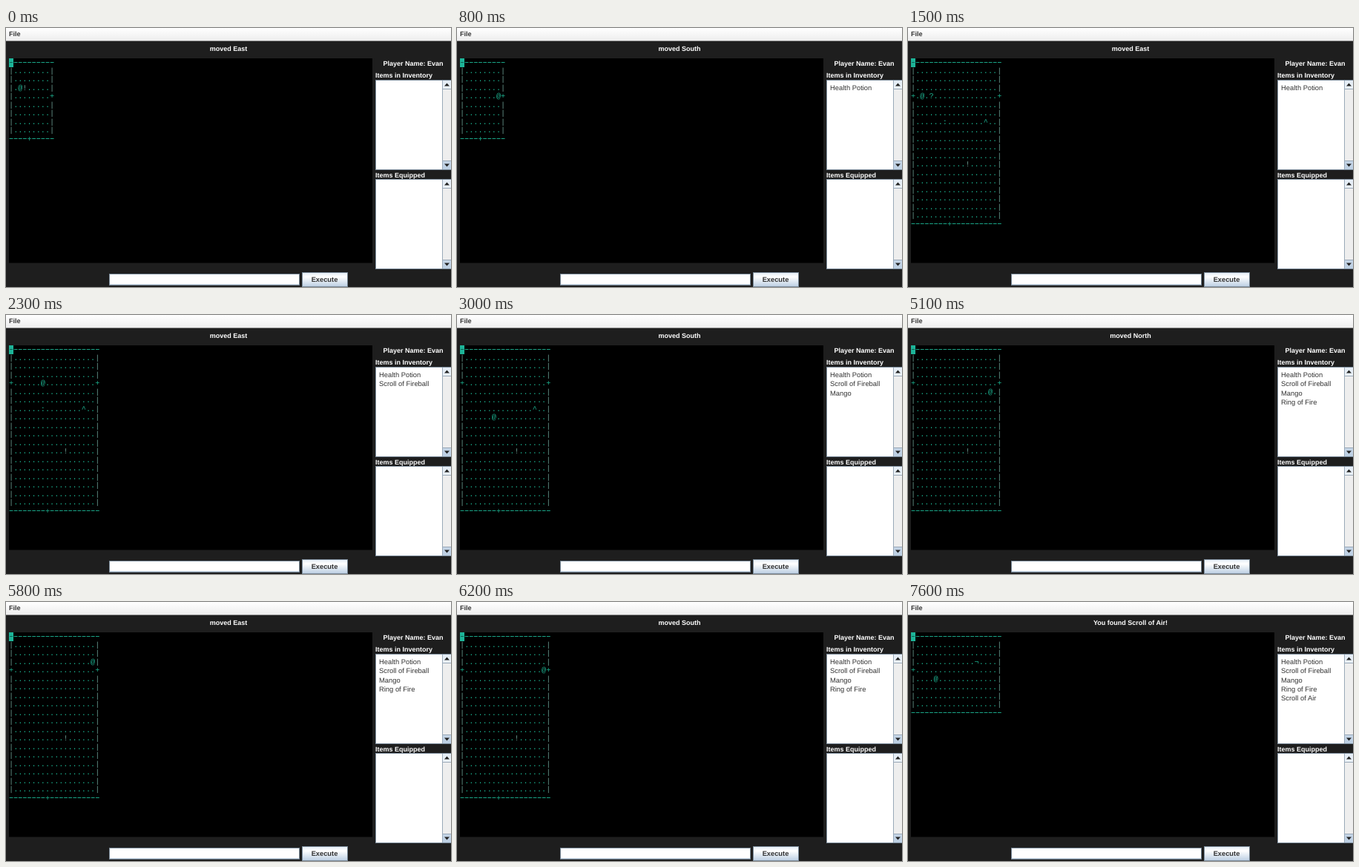
An HTML page for the animation above (7.7 s loop, 600x350 px).

```html
<!DOCTYPE html>
<html lang="en">
<head>
<meta charset="utf-8">
<title>Dungeon crawler</title>
<style>
  html, body { margin: 0; width: 100%; height: 100%; overflow: hidden; background: #1e1e1e; }
  svg { display: block; width: 600px; height: 350px; }
  text { font: 9.4px "Liberation Sans", Arial, sans-serif; fill: #333; white-space: pre; text-rendering: geometricPrecision; }
  .bold { font-weight: bold; font-size: 9px; }
  .light { fill: #fff; }
  .mid { text-anchor: middle; }
  #map text { font: 10.2px "Liberation Mono", "Courier New", monospace; fill: #1db492; }
  #map .dim { fill: #6a9c90; }
  #map path { stroke: #1aa587; stroke-width: 1; fill: none; }
</style>
</head>
<body>
<svg viewBox="0 0 600 350">
  <defs>
    <linearGradient id="bar" x2="0" y2="1">
      <stop stop-color="#fff"/><stop offset="1" stop-color="#ededed"/>
    </linearGradient>
    <linearGradient id="metal" x2="0" y2="1">
      <stop stop-color="#e3ecf5"/><stop offset=".3" stop-color="#fff"/><stop offset="1" stop-color="#bccfe3"/>
    </linearGradient>
    <g id="list">
      <rect x=".5" y=".5" width="102" height="121" fill="#fff" stroke="#7a8a99"/>
      <rect x="90" y="1" width="12" height="120" fill="#eee"/>
      <path d="M90.5 1V121M90 12.5H102M90 109.5H102" stroke="#9aa9b8"/>
      <path d="M91 1H102V12H91ZM91 110H102V121H91Z" fill="url(#metal)"/>
      <path d="M93 8.5L96.5 4.5L100 8.5ZM93 113.5L96.5 117.5L100 113.5Z" fill="#222"/>
    </g>
  </defs>

  <rect width="600" height="350" fill="#1e1e1e"/>
  <rect width="600" height="17.5" fill="url(#bar)"/>
  <text class="bold" x="4" y="11.3">File</text>
  <text class="bold light mid" id="message" x="300" y="31.3"></text>

  <rect x="4" y="41" width="490" height="276.5"/>
  <g id="map"></g>
  <rect x="4" y="41" width="6" height="12" fill="#1db498"/>
  <path d="M5 46.5h4" stroke="#0c5f50"/>

  <text class="bold light mid" x="549" y="51.3">Player Name: Evan</text>
  <text class="bold light" x="498" y="67.3">Items in Inventory</text>
  <use href="#list" x="498" y="70"/>
  <g id="items"></g>
  <text class="bold light" x="498" y="201.5">Items Equipped</text>
  <use href="#list" x="498" y="204"/>

  <rect x="139.5" y="332.5" width="256" height="15" fill="#fff" stroke="#7a8a99"/>
  <path d="M140 346.5H395" stroke="#c5d3e0"/>
  <rect x="399.5" y="330.5" width="61" height="19" fill="url(#metal)" stroke="#7a8a99"/>
  <text class="bold mid" x="429.5" y="343.4" style="font-size:9.3px">Execute</text>
</svg>

<script>
const LOOP = 7700, CELL_W = 6.125, CELL_H = 11.5;

const rooms = [
  { w: 10, h: 10, doors: [[9, 4], [4, 9]], items: [[3, 3, '!', 'Health Potion']] },
  { w: 20, h: 20, doors: [[0, 4], [19, 4], [8, 19]], items: [
    [4, 4, '?', 'Scroll of Fireball'], [7, 7, ':', 'Mango'],
    [16, 7, '^', 'Ring of Fire'], [12, 12, '!', '']] },
  { w: 20, h: 10, doors: [[0, 4]], items: [[5, 5, '?', 'Scroll of Air'], [14, 3, '¬', '']] }
];

const dirs = { N: [0, -1, 'North'], S: [0, 1, 'South'], E: [1, 0, 'East'], W: [-1, 0, 'West'] };

// Time in ms and direction; X walks through a door into the next room.
const moves = `200E 300E 400E 500E 600E 700E 800S 1000E 1100X 1400E 1700E
  1800E 2000E 2100E 2300E 2400S 2600S 2800S 3000S 3100W 3200N 3300E 3500E
  3700E 3800E 3900E 4000E 4100E 4200E 4400E 4600E 4800E 4900N 5100N 5300N
  5400N 5600E 6000S 6300E 6500X 6800E 7000E 7200E 7300E 7500S`.split(/\s+/);

const states = [{ time: 0, room: 0, x: 2, y: 3, message: 'moved East', bag: [] }];
for (const move of moves) {
  const next = { ...states.at(-1), time: parseInt(move) };
  const dir = dirs[move.at(-1)];
  if (dir) {
    next.x += dir[0];
    next.y += dir[1];
    next.message = 'moved ' + dir[2];
    const found = rooms[next.room].items.find(([x, y]) => x === next.x && y === next.y);
    if (found && !next.bag.includes(found[3])) {
      next.bag = [...next.bag, found[3]];
      next.message = `You found ${found[3]}!`;
    }
  } else {
    next.room++;
    next.x = 1;
    next.y = 4;
  }
  states.push(next);
}

const byId = id => document.getElementById(id);

function roomGrid({ room, x, y, bag }) {
  const { w, h, doors, items } = rooms[room];
  const grid = Array.from({ length: h }, (_, r) => Array.from({ length: w }, (_, c) =>
    r === 0 || r === h - 1 ? '-' : c === 0 || c === w - 1 ? '|' : '.'));
  for (const [c, r] of doors) grid[r][c] = '+';
  for (const [c, r, glyph, name] of items) if (!bag.includes(name)) grid[r][c] = glyph;
  grid[y][x] = '@';
  return grid;
}

function draw(state) {
  let dashes = '', rows = '';
  roomGrid(state).forEach((row, r) => {
    const top = 41 + r * CELL_H;
    const glyphs = row.map((glyph, c) => {
      if (glyph === '-') {
        dashes += `M${4.6 + c * CELL_W} ${Math.floor(top + 5) + 0.5}h4.8`;
        return ' ';
      }
      return '|!'.includes(glyph) ? `<tspan class="dim">${glyph}</tspan>` : glyph;
    });
    rows += `<text x="4" y="${top + 8.2}">${glyphs.join('')}</text>`;
  });
  byId('map').innerHTML = rows + `<path d="${dashes}"/>`;
  byId('message').textContent = state.message;
  byId('items').innerHTML = state.bag.map((name, i) =>
    `<text x="503" y="${84.2 + i * 12.25}">${name}</text>`).join('');
}

let shown;
function tick() {
  const time = performance.now() % LOOP;
  const state = states.findLast(s => s.time <= time);
  if (state !== shown) draw(shown = state);
  requestAnimationFrame(tick);
}
tick();
</script>
</body>
</html>
```
